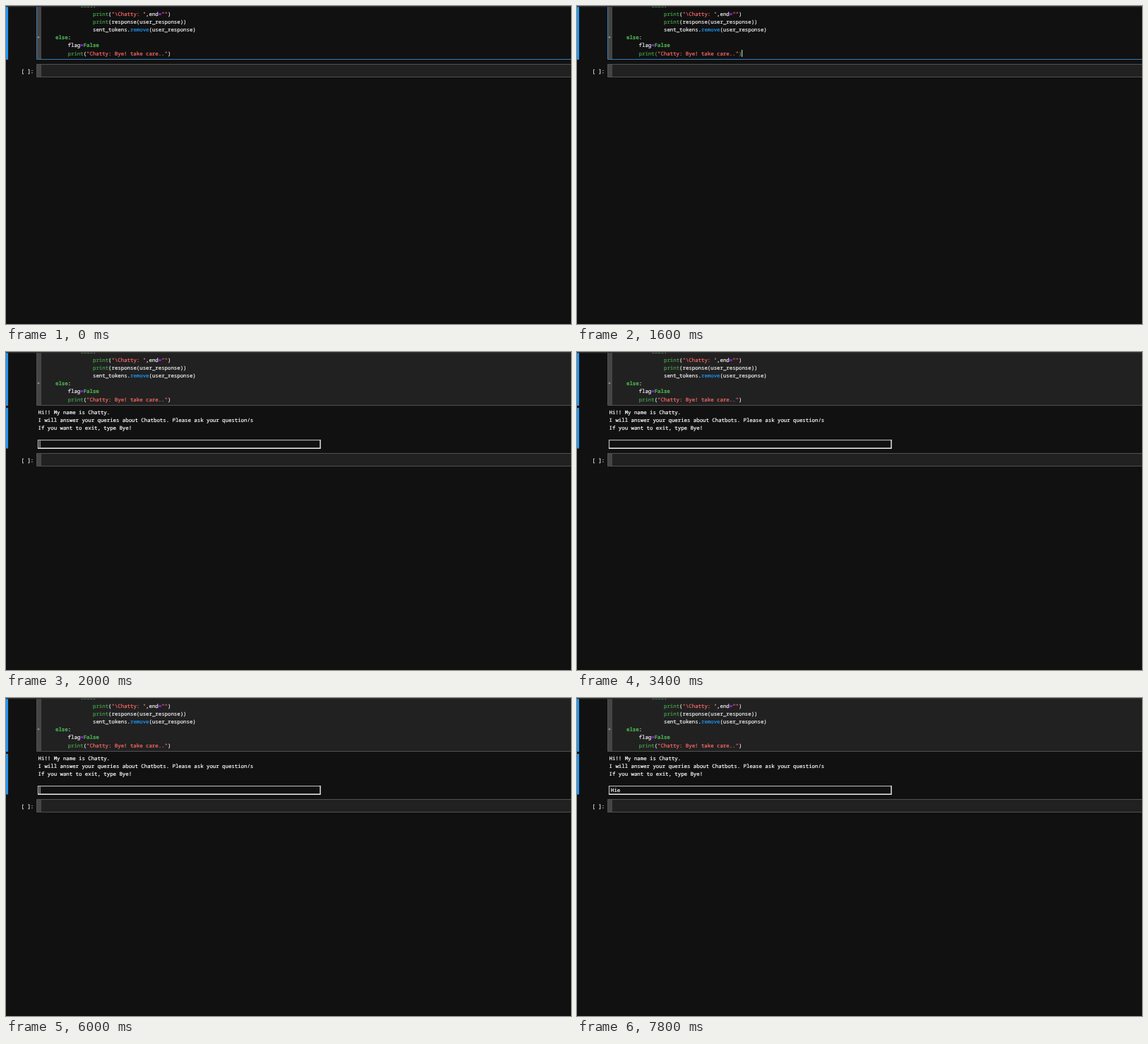
These frames come from a looping animation (800 by 450 pixels, 8 s). An HTML page:

```html
<!DOCTYPE html>
<html lang="en">
<head>
<meta charset="utf-8">
<title>Notebook chatbot</title>
<style>
  html, body { margin: 0; width: 100%; height: 100%; overflow: hidden; background: #111; }
  svg { display: block; width: 100vw; height: 100vh; }
  text {
    font: 7.37px "Noto Sans Mono", "DejaVu Sans Mono", monospace;
    white-space: pre; text-rendering: geometricPrecision; color: #f2f2f2;
  }
  text, tspan { fill: currentColor; stroke: currentColor; stroke-width: 0.2; }
  .output text { color: #fff; }
  .builtin { color: #43a047; }
  .keyword { color: #4caf50; font-weight: bold; }
  .operator { color: #a2f; font-weight: bold; }
  .string { color: #ff6a66; }
  .property { color: #2196f3; }
  .matched .bracket { color: #3fae45; }
  .bar { fill: #2196f3; }
  .cell { fill: #212121; }
  .gutter { fill: #454545; }
  .border { fill: none; stroke: #505050; }
  .active .cell { fill: #111; }
  .active .border { stroke: #3a78b5; }
  .inset { fill: none; stroke-width: 1.4; }
  .caret { fill: #e8e8e8; }
</style>
</head>
<body>
<svg viewBox="0 0 800 450">
  <g id="codeCell">
    <rect class="cell" x="43" y="0" width="757" height="75.5"/>
    <rect class="gutter" x="43.5" y="0" width="6.5" height="75"/>
    <path class="border" d="M43.5 0V75.5H800"/>
    <rect class="bar" y="1" width="3" height="75"/>
    <path d="M44.3 43.4h3.4l-1.7 2.4z" fill="#aaa"/>
    <text x="105.3" y="2.4"><tspan class="keyword">else</tspan>:</text>
    <text x="123" y="13.6"><tspan class="builtin">print</tspan>(<tspan class="string">"\Chatty: "</tspan>,end<tspan class="operator">=</tspan><tspan class="string">""</tspan>)</text>
    <text x="123" y="24.8"><tspan class="builtin">print</tspan>(response(user_response))</text>
    <text x="123" y="36">sent_tokens.<tspan class="property">remove</tspan>(user_response)</text>
    <text x="70" y="47.1"><tspan class="keyword">else</tspan>:</text>
    <text x="87.6" y="58.3">flag<tspan class="operator">=</tspan><tspan class="keyword">False</tspan></text>
    <text x="87.6" y="69.5"><tspan class="builtin">print</tspan><tspan class="bracket">(</tspan><tspan class="string">"Chatty: Bye! take care.."</tspan><tspan class="bracket">)</tspan></text>
    <rect id="codeCaret" class="caret" x="233.2" y="62" width="1" height="10"/>
  </g>
  <rect width="800" height="1.4" fill="#303030"/>

  <g id="greeting" class="output">
    <rect class="bar" y="79" width="3" height="57.5"/>
    <text x="45.6" y="87.6">Hi!! My name is Chatty.</text>
    <text x="45.6" y="98.8">I will answer your queries about Chatbots. Please ask your question/s</text>
    <text x="45.6" y="109.9">If you want to exit, type Bye!</text>
  </g>

  <g id="inputBox" class="output">
    <path class="inset" stroke="#a8a8a8" d="M45.5 136.4V124.6H445"/>
    <path class="inset" stroke="#efefef" d="M45 136.2H445V124"/>
    <text id="typed" x="48" y="132.9"></text>
    <rect id="inputCaret" class="caret" y="125.4" width="0.9" height="10"/>
  </g>

  <g id="nextCell">
    <text x="21.6" y="94.5">[ ]:</text>
    <rect class="cell" x="43" y="82" width="757" height="19"/>
    <rect class="gutter" x="43.5" y="82.5" width="6.5" height="18"/>
    <path class="border" d="M800 82.5H43.5V100.5H800"/>
  </g>
</svg>
<script>
  const LOOP = 8000, FOCUS = 600, RUN = 1800, GREET = 2000, TYPE = 7200, STEP = 200;
  const CHAR_WIDTH = 4.42, REPLY = "Hie";
  const inputBlinks = [2400, 2800, 3400, 4000, 4400, 5000, 5600, 6000, 6600];
  const byId = id => document.getElementById(id);
  const show = (id, on) => byId(id).style.display = on ? "" : "none";
  const shiftY = (id, dy) => byId(id).setAttribute("transform", `translate(0 ${dy})`);

  function draw(time) {
    const t = time % LOOP;
    const focused = t >= FOCUS && t < RUN;
    byId("codeCell").classList.toggle("active", t < RUN);
    byId("codeCell").classList.toggle("matched", focused);
    show("codeCaret", focused && (t < 1200 || t >= 1600));

    show("greeting", t >= GREET);
    show("inputBox", t >= RUN);
    shiftY("inputBox", t < GREET ? -47.8 : 0);
    shiftY("nextCell", t < RUN ? 0 : t < GREET ? 13 : 61);

    const typedCount = t < TYPE ? 0 : Math.min(REPLY.length, Math.floor((t - TYPE) / STEP) + 1);
    byId("typed").textContent = REPLY.slice(0, typedCount);
    byId("inputCaret").setAttribute("x", 47.6 + typedCount * CHAR_WIDTH);
    const toggles = inputBlinks.filter(at => t >= at).length;
    show("inputCaret", t < TYPE ? toggles % 2 === 0 : t < TYPE + REPLY.length * STEP);
  }

  let start;
  function frame(now) {
    start ??= now;
    draw(now - start);
    requestAnimationFrame(frame);
  }
  draw(0);
  requestAnimationFrame(frame);
</script>
</body>
</html>
```
